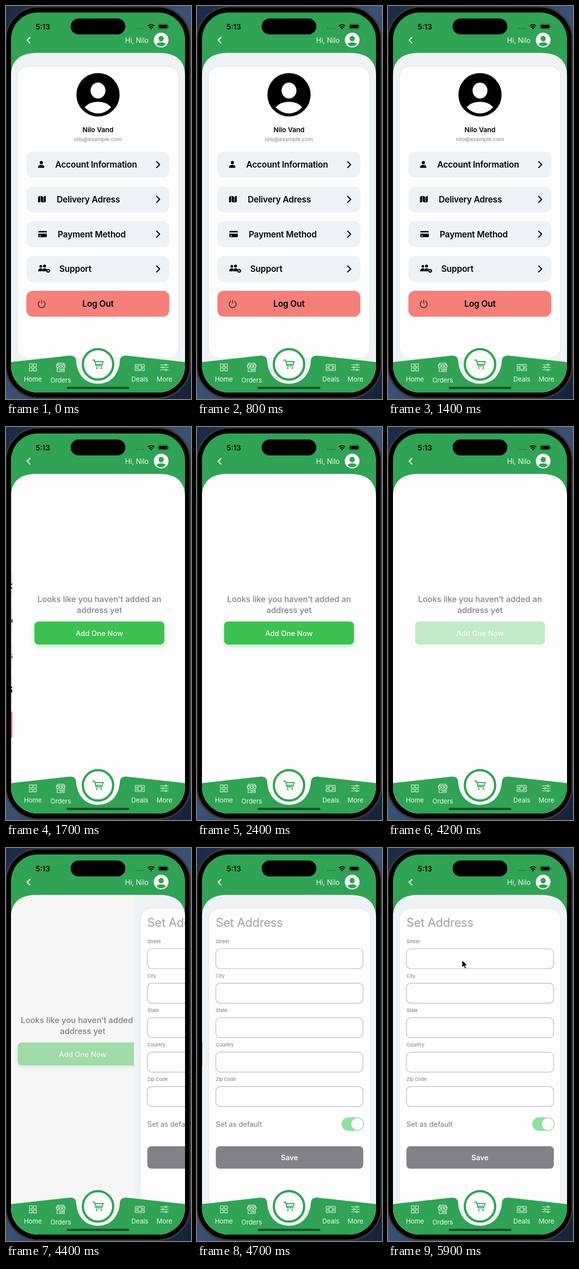
An HTML page for the animation above (6 s loop, 372x788 px).

```html
<!DOCTYPE html>
<html lang="en">
<head>
<meta charset="utf-8">
<title>Delivery app</title>
<style>
  html, body { margin: 0; width: 100%; height: 100%; overflow: hidden; background: #16233c; }
  svg { display: block; width: 372px; height: 788px; font-family: Inter, sans-serif; }
  .mid { text-anchor: middle; }
  .line { fill: none; stroke-linecap: round; stroke-linejoin: round; }
  .row { font-size: 17px; font-weight: 600; letter-spacing: -.2px; }
  .tab { font-size: 13px; letter-spacing: -.1px; fill: #f2fbf5; }
  .label { font-size: 9.5px; fill: #77767b; }
</style>
</head>
<body>
<svg viewBox="0 0 372 788">
  <defs>
    <linearGradient id="wall" x2="1" y2="1">
      <stop offset="0" stop-color="#1a2a47"/><stop offset=".5" stop-color="#3a5075"/><stop offset="1" stop-color="#14213a"/>
    </linearGradient>
    <clipPath id="screen"><rect x="10" y="13" width="350" height="762" rx="54"/></clipPath>
    <clipPath id="sheet"><path d="M10 775V140C10 108 30 94 62 94H308C340 94 360 108 360 140V775Z"/></clipPath>
    <filter id="glow" x="-10%" y="-30%" width="120%" height="180%">
      <feDropShadow dx="0" dy="4" stdDeviation="4" flood-color="#3bc14f" flood-opacity=".35"/>
    </filter>
  </defs>

  <rect width="372" height="788" fill="url(#wall)"/>
  <rect x="-.5" y="1.5" width="371" height="785" rx="66" stroke="#39393b" stroke-width="3"/>

  <g clip-path="url(#screen)">
    <rect x="10" y="13" width="350" height="762" fill="#30a354"/>
    <g clip-path="url(#sheet)">
      <g id="account">
        <rect x="10" y="94" width="350" height="681" fill="#eef2f5"/>
        <rect x="23" y="121" width="324.5" height="585.5" rx="22" fill="#fdfdfd" stroke="#dfe3e7"/>
        <circle cx="185" cy="178" r="43.5"/>
        <ellipse cx="185" cy="169.500" rx="15" ry="16" fill="#fdfdfd"/>
        <path d="M158 203Q168 192 185 192T211.500 203Q200 215.500 185 215.500T158 203Z" fill="#fdfdfd"/>
        <text class="mid" x="185" y="252.500" font-size="13.5" font-weight="600">Nilo Vand</text>
        <text class="mid" x="185" y="271" font-size="10.8" fill="#88878c">nilo@example.com</text>
        <g id="rows"></g>
        <g id="rowIcons">
          <circle cx="71" cy="314" r="3.200"/>
          <path d="M64.500 324.500V322.500Q65.500 318.500 71 318.500T77 322.500V324.500Z"/>
          <path d="M64.500 382.500L69 380.500V392.500L64.500 394.500ZM70 380.500L74.500 382.500V394.500L70 392.500ZM75.500 382.500L80 380.500V392.500L75.500 394.500Z"/>
          <path d="M66.500 451H80.500Q82 451 82 452.500V454H65V452.500Q65 451 66.500 451ZM65 456.500H82V462Q82 463.500 80.500 463.500H66.500Q65 463.500 65 462Z"/>
          <path d="M67 461H70.500" stroke="#eef2f5" stroke-width="1.500"/>
          <circle cx="70" cy="522" r="2.700"/><circle cx="77.500" cy="521.500" r="3"/>
          <path d="M65 532V529.500Q66 526 70 526L73 526.500L71.500 532ZM72.500 532V530Q73.500 526 77.500 526Q80.500 526 82 528L80.500 532Z"/>
          <circle cx="84.800" cy="531" r="2.400" fill="none" stroke="#000" stroke-width="1.900"/>
          <circle cx="84.800" cy="531" r="3.500" fill="none" stroke="#000" stroke-width="1.200" stroke-dasharray="1.400 1.350"/>
          <path class="line" d="M68 592A7 7 0 1 0 75.500 592M71.700 589.500V596" stroke="#111" stroke-width="1.200"/>
        </g>
      </g>
      <rect id="dim1" x="10" y="94" width="350" height="681"/>

      <g id="empty">
        <rect x="10" y="94" width="350" height="681" fill="#fdfdfd"/>
        <g class="mid" font-size="16.5" font-weight="500" letter-spacing="-.1" fill="#85848a">
          <text x="185" y="351">Looks like you haven’t added an</text>
          <text x="185" y="373">address yet</text>
        </g>
        <g id="add">
          <rect x="54.500" y="390" width="261" height="46" rx="8" fill="#3bc14f" filter="url(#glow)"/>
          <text class="mid" x="185" y="418.500" font-size="14.5" font-weight="500" fill="#f4fdf6">Add One Now</text>
        </g>
      </g>
      <rect id="dim2" x="10" y="94" width="350" height="681"/>

      <g id="form">
        <rect x="10" y="94" width="350" height="681" fill="#eef2f5"/>
        <rect x="23" y="121" width="324.500" height="606" rx="22" fill="#fdfdfd" stroke="#dfe3e7"/>
        <text x="37" y="158" font-size="24" letter-spacing="-.3" fill="#a1a0a5">Set Address</text>
        <g id="fields"></g>
        <text x="37" y="559" font-size="14.5" letter-spacing="-.1" fill="#7d7c81">Set as default</text>
        <rect x="290" y="540" width="45" height="27" rx="13.500" fill="#8fdf9f"/>
        <circle cx="321.500" cy="553.500" r="12" fill="#fdfdfd"/>
        <rect x="37" y="598" width="296.500" height="45" rx="8" fill="#838287"/>
        <text class="mid" x="185" y="626" font-size="14.5" font-weight="600" fill="#fdfdfd">Save</text>
      </g>
    </g>

    <!-- status bar and header -->
    <text x="59.500" y="46.800" font-size="14.5" font-weight="600">5:13</text>
    <rect x="130" y="25" width="110" height="32" rx="16"/>
    <path class="line" d="M263 45H277" stroke="#1f6d39" stroke-width="2.400" stroke-dasharray="0 4.500"/>
    <path class="line" d="M285.500 40A9 9 0 0 1 298 40M288 43A5.500 5.500 0 0 1 295.500 43" stroke="#000" stroke-width="2.200" style="stroke-linecap:butt"/>
    <path d="M291.800 47L289.500 44.800Q291.800 43 294 44.800Z"/>
    <rect x="306" y="36.500" width="20" height="9.500" rx="3" fill="none" stroke="#17542c"/>
    <rect x="307.500" y="38" width="17" height="6.500" rx="1.800"/>
    <path d="M327.500 39.500Q329.500 41.200 327.500 43Z" fill="#17542c"/>
    <path class="line" d="M48 63L42.500 68.500L48 74" stroke="#fff" stroke-width="2.300"/>
    <text x="239.500" y="74" font-size="14" fill="#f2fbf5">Hi, Nilo</text>
    <circle cx="312" cy="68.200" r="14.800" fill="#fdfdfd"/>
    <g fill="#30a354">
      <ellipse cx="312" cy="65.300" rx="5.200" ry="5.600"/>
      <path d="M302.500 76.500Q306 72.800 312 72.800T321.500 76.500Q317.500 80.700 312 80.700T302.500 76.500Z"/>
    </g>

    <!-- tab bar -->
    <path fill="#30a354" d="M10 714L128 701Q140 700 141 711C143 742 162 757.500 185 757.500S227 742 229 711Q230 700 242 701L360 714V775H10Z"/>
    <circle cx="185" cy="718.500" r="30.500" fill="#fdfdfd" stroke="#30a354" stroke-width="4.500"/>
    <g class="line" stroke="#30a354" stroke-width="1.900">
      <path d="M174.500 710H178L181 721.500H193.500M178.800 713H195.500L193.500 718.500H180.500"/>
      <circle cx="182.500" cy="726" r=".8"/><circle cx="191.500" cy="726" r=".8"/>
    </g>
    <g class="line" stroke="#f2fbf5" stroke-width="1.100">
      <path d="M47 717.500H52.800V723.300H47ZM55.300 717.500H61.100V723.300H55.300ZM47 725.800H52.800V731.600H47ZM55.300 725.800H61.100V731.600H55.300Z"/>
      <path d="M104 716H116L119 721H101ZM103 718.500H117M101 721Q101 725 104 725T107 721Q107 725 110 725T113 721Q113 725 116 725T119 721M102.800 725V733H117.200V725M105 727.500H109V733M111.500 727.500H115V730.500H111.500Z"/>
      <path d="M261.500 718.500H276.500Q278.500 718.500 278.500 720.500V722.500Q276 724.500 278.500 726.800V729Q278.500 731 276.500 731H261.500Q259.500 731 259.500 729V726.800Q262 724.500 259.500 722.500V720.500Q259.500 718.500 261.500 718.500ZM265.500 721H272.500V728.500H265.500ZM263 721V728.500M275 721V728.500"/>
      <path d="M310.500 719.500H319.500M323.500 719.500H326.500M310.500 724.500H313.500M317.500 724.500H326.500M310.500 729.500H319.500M323.500 729.500H326.500"/>
      <circle cx="321.500" cy="719.500" r="1.700"/><circle cx="315.500" cy="724.500" r="1.700"/><circle cx="321.500" cy="729.500" r="1.700"/>
    </g>
    <g class="tab mid">
      <text x="54" y="753">Home</text><text x="110" y="754.500">Orders</text>
      <text x="269" y="753">Deals</text><text x="318.500" y="752.500">More</text>
    </g>
    <rect x="122" y="763.500" width="126" height="4.500" rx="2.250" fill="#1b4f2c"/>
  </g>
  <path id="cursor" d="M0 0V14.500L3.400 11.500L5.800 16.800L8.200 15.700L5.900 10.600H10.500Z" stroke="#fff" stroke-width=".9"/>
</svg>
<script>
const $ = id => document.getElementById(id);

const rows = [["Account Information", 99], ["Delivery Adress", 102], ["Payment Method", 104], ["Support", 107], ["Log Out"]];
$("rows").innerHTML = rows.map(([name, x], i) => {
  const y = 292 + i * 69.75;
  return `<rect x="41" y="${y}" width="287.5" height="52" rx="13" fill="${x ? "#eef2f5" : "#f57f79"}"/>
    <text class="row ${x ? "" : "mid"}" x="${x || 185}" y="${y + 32}">${name}</text>` +
    (x ? `<path class="line" d="M303 ${y + 20}l6 6l-6 6" stroke="#000" stroke-width="2.3"/>` : "");
}).join("");

$("fields").innerHTML = ["Street", "City", "State", "Country", "Zip Code"].map((name, i) => {
  const y = 202 + i * 69.1;
  return `<text class="label" x="37" y="${y - 11.5}">${name}</text>
    <rect x="37" y="${y}" width="296" height="40" rx="9" fill="#fdfdfd" stroke="#b6b5b9" stroke-width="1.2"/>`;
}).join("");

const LOOP = 6000, STEP = 100, WIDTH = 350;
const clamp = x => Math.min(1, Math.max(0, x));
const ease = x => x < .5 ? 2 * x * x : 1 - 2 * (1 - x) ** 2;
const tween = (t, start, length) => ease(clamp((t - start) / length));

// critically damped spring used for page pushes
const push = (t, start) => {
  const k = Math.max(0, t - start) * .024;
  return 1 - Math.exp(-k) * (1 + k);
};
const shift = (id, x, y = 0) => $(id).setAttribute("transform", `translate(${x} ${y})`);

function draw(t) {
  const first = push(t, 1412), second = push(t, 4355);
  shift("account", -.3 * WIDTH * first);
  shift("empty", WIDTH * (1 - first) - .3 * WIDTH * second);
  shift("form", WIDTH * (1 - second));
  $("dim1").setAttribute("opacity", .1 * first);
  $("dim2").setAttribute("opacity", .1 * second);
  $("add").setAttribute("opacity", 1 - .8 * (tween(t, 4088, 150) - tween(t, 4300, 250)));

  const settle = tween(t, 2800, 400), move = tween(t, 5300, 500);
  shift("cursor", 200 + 10 * settle - 61 * move, 400 + 17 * settle - 192 * move);
  $("cursor").setAttribute("visibility", (t >= 2800 && t < 4000) || t >= 5300 ? "visible" : "hidden");
}

function tick() {
  draw(Math.floor(performance.now() % LOOP / STEP) * STEP);
  requestAnimationFrame(tick);
}
tick();
</script>
</body>
</html>
```
